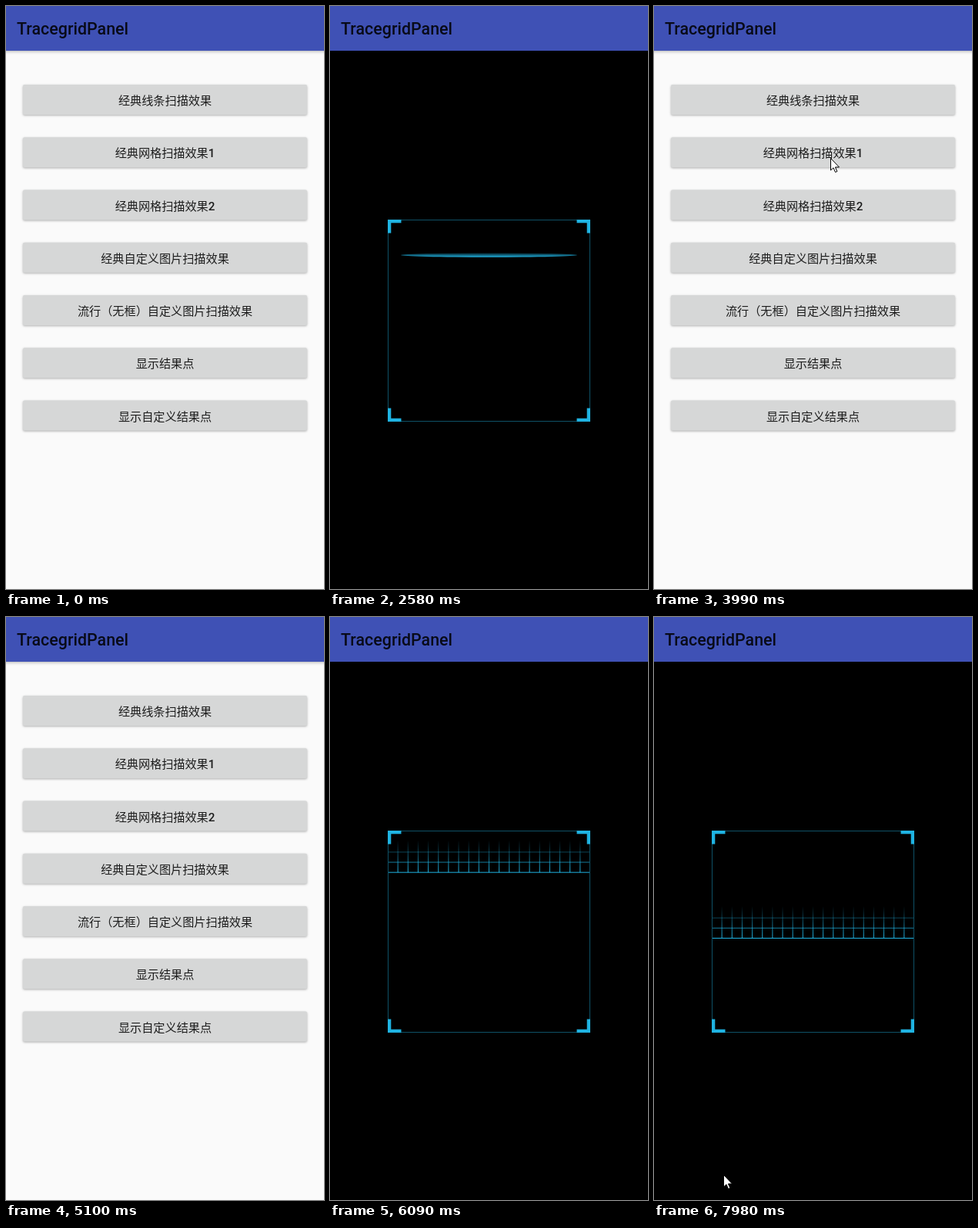
These frames come from a looping animation (413 by 756 pixels, 8 s). An HTML page with a canvas:

```html
<!DOCTYPE html>
<html lang="zh-CN">
<head>
<meta charset="utf-8">
<style>
html, body { margin: 0; width: 100%; height: 100%; overflow: hidden; background: #fafafa; }
canvas { display: block; }
</style>
</head>
<body>
<canvas width="413" height="756"></canvas>
<script>
const W = 413, H = 756, LOOP = 8000, STEP = 30;
const CENTER_X = W / 2, CENTER_Y = 390, BAR = 58;
const BLUE = '#3f51b5', INK = 'rgba(0,0,0,.87)';
const CYAN = a => `rgba(31,179,226,${a})`;
const CJK = '350 15.15px "Noto Sans CJK SC", "Noto Sans CJK", sans-serif';
const LATIN = '500 15.15px Roboto, sans-serif';
const LABELS = ['经典线条扫描效果', '经典网格扫描效果1', '经典网格扫描效果2',
  '经典自定义图片扫描效果', '流行（无框）自定义图片扫描效果', '显示结果点', '显示自定义结果点'];
const FRAME = { left: 75, top: 277, right: 338, bottom: 539 };

// Times at which a scanner screen opens and closes.
const OPEN_LINE = 1809, CLOSE_LINE = 3505, OPEN_GRID = 5108;

// Key points: time, then position.
const LASER = [[1890, 278], [2580, 323], [3210, 353.5]];
const GRID = [[5140, 278], [5730, 316], [6810, 360], [7980, 416]];
const FIRST = [219, 121], SECOND = [229, 197], BELOW = [95, 760];
const POINTER = [
  [[60, 375, 62], [540, ...FIRST], [1050, ...FIRST], [1560, ...BELOW]],
  [[3600, ...BELOW], [3990, ...SECOND], [4680, ...SECOND], [4950, ...BELOW]],
  [[7980, 90, 723], [LOOP, 90, 723]]
];

const ctx = document.querySelector('canvas').getContext('2d');
const clamp = v => Math.min(1, Math.max(0, v));
const smooth = u => u * u * (3 - 2 * u);

// Fast out, extra slow in.
function settle(x) {
  const k = clamp(x) ** 3.3;
  return 1.005 * k / (k + .005);
}

// Interpolates rows of [time, ...values].
function track(rows, t, ease = u => u) {
  if (t <= rows[0][0]) return rows[0].slice(1);
  const i = rows.findIndex(r => r[0] > t);
  if (i < 0) return rows[rows.length - 1].slice(1);
  const a = rows[i - 1], b = rows[i], u = ease((t - a[0]) / (b[0] - a[0]));
  return a.slice(1).map((v, k) => v + (b[k + 1] - v) * u);
}

function rect(color, x, y, w, h) {
  ctx.fillStyle = color;
  ctx.fillRect(x, y, w, h);
}

// Vertical fade from a faint to a full cyan.
function fade(top, bottom, faint) {
  const g = ctx.createLinearGradient(0, top, 0, bottom);
  g.addColorStop(0, CYAN(faint));
  g.addColorStop(1, CYAN(1));
  return g;
}

function raised(blur, draw) {
  ctx.save();
  ctx.shadowColor = 'rgba(0,0,0,.3)';
  ctx.shadowBlur = blur;
  ctx.shadowOffsetY = 1;
  draw();
  ctx.restore();
}

function scaled(scale, alpha, draw) {
  ctx.save();
  ctx.globalAlpha = alpha;
  ctx.translate(CENTER_X, CENTER_Y);
  ctx.scale(scale, scale);
  ctx.translate(-CENTER_X, -CENTER_Y);
  draw();
  ctx.restore();
}

function header() {
  rect(BLUE, 0, 0, W, BAR);
  ctx.fillStyle = INK;
  ctx.font = '500 21.4px Roboto, sans-serif';
  ctx.fillText('TracegridPanel', 14, 37);
}

function label(text, y) {
  const [, han, digit] = text.match(/^(\D+)(\d?)$/);
  ctx.fillStyle = INK;
  ctx.font = LATIN;
  const digitWidth = ctx.measureText(digit).width;
  ctx.font = CJK;
  const hanWidth = ctx.measureText(han).width;
  const x = (W - hanWidth - digitWidth) / 2;
  ctx.fillText(han, x, y);
  ctx.font = LATIN;
  ctx.fillText(digit, x + hanWidth, y);
}

// Touch wave inside the current path.
function ripple(age, [x, y]) {
  const grow = clamp(age / 200), out = clamp((age - 200) / 150);
  if (age < 0 || out === 1) return;
  ctx.save();
  ctx.clip();
  ctx.fillStyle = `rgba(0,0,0,${.12 * (1 - out)})`;
  ctx.beginPath();
  ctx.arc(x, y, 15 + 225 * smooth(grow), 0, 7);
  ctx.fill();
  ctx.restore();
}

function list(t) {
  rect('#fafafa', 0, 0, W, H);
  raised(4, () => rect(BLUE, -20, -20, W + 40, BAR + 20));
  header();
  LABELS.forEach((text, i) => {
    const y = 102 + i * 68.25;
    ctx.beginPath();
    ctx.roundRect(22, y, 369, 39, 2);
    raised(3, () => {
      ctx.fillStyle = '#d6d7d7';
      ctx.fill();
    });
    if (i === 0) ripple(t - 690, FIRST);
    if (i === 1) ripple(t - 4590, SECOND);
    label(text, y + 26);
  });
}

function laser(t) {
  const [y] = track(LASER, t), half = 2.7;
  ctx.fillStyle = fade(y - half, y + half, .15);
  ctx.beginPath();
  ctx.ellipse(CENTER_X, y, 114.5, half, 0, 0, 7);
  ctx.fill();
}

function grid(t) {
  const { left, right } = FRAME;
  const bottom = track(GRID, t)[0] + .5;
  const top = Math.max(FRAME.top, bottom - 41), cell = (right - left) / 20;
  ctx.strokeStyle = fade(top, bottom, .02);
  ctx.lineWidth = 1;
  ctx.beginPath();
  for (let x = left + cell; x < right - 1; x += cell) {
    ctx.moveTo(x, top);
    ctx.lineTo(x, bottom);
  }
  for (let y = bottom; y > top + 2; y -= cell) {
    ctx.moveTo(left + 1, y);
    ctx.lineTo(right - 1, y);
  }
  ctx.stroke();
}

function scanner(t) {
  const { left, top, right, bottom } = FRAME;
  rect('#000', 0, BAR, W, H);
  header();
  ctx.strokeStyle = CYAN(.45);
  ctx.lineWidth = 1;
  ctx.strokeRect(left + .5, top + .5, right - left - 1, bottom - top - 1);
  (t < OPEN_GRID ? laser : grid)(t);
  for (const [x, sx] of [[left, 1], [right, -1]]) {
    for (const [y, sy] of [[top, 1], [bottom, -1]]) {
      rect(CYAN(1), x, y, sx * 17.5, sy * 4.3);
      rect(CYAN(1), x, y, sx * 4.3, sy * 17.5);
    }
  }
}

function backdrop() {
  rect('#000', 0, 0, W, H);
  rect(BLUE, 0, 0, W, BAR);
}

function opening(t, start) {
  const age = t - start, p = settle(age / 400);
  const alpha = clamp((age - 50) / 50);
  if (p < .9) scaled(1 + .05 * p, 1, () => list(t));
  else backdrop();
  scaled(.85 + .15 * p, alpha, () => scanner(t));
}

function closing(t) {
  const age = t - CLOSE_LINE, p = settle(age / 400);
  const alpha = 1 - clamp((age - 35) / 50);
  scaled(1.05 - .05 * p, 1, () => list(t));
  scaled(1 - .1 * p, alpha, () => scanner(t));
}

function pointer(t) {
  const path = POINTER.find(p => t >= p[0][0] && t <= p[p.length - 1][0]);
  if (!path) return;
  const [x, y] = track(path, t, smooth);
  ctx.save();
  ctx.translate(x + .5, y + .5);
  const arrow = new Path2D('M0 0V15.5L3.5 12.3 6 18 8.4 17 5.9 11.5H11Z');
  ctx.fillStyle = '#fff';
  ctx.strokeStyle = '#000';
  ctx.lineWidth = 1;
  ctx.fill(arrow);
  ctx.stroke(arrow);
  ctx.restore();
}

function draw(now) {
  const t = Math.floor((now % LOOP) / STEP) * STEP;
  if (t < OPEN_LINE) list(t);
  else if (t < CLOSE_LINE) opening(t, OPEN_LINE);
  else if (t < OPEN_GRID) closing(t);
  else opening(t, OPEN_GRID);
  pointer(t);
}

const begin = performance.now();
(function tick() {
  draw(performance.now() - begin);
  requestAnimationFrame(tick);
})();
</script>
</body>
</html>
```
